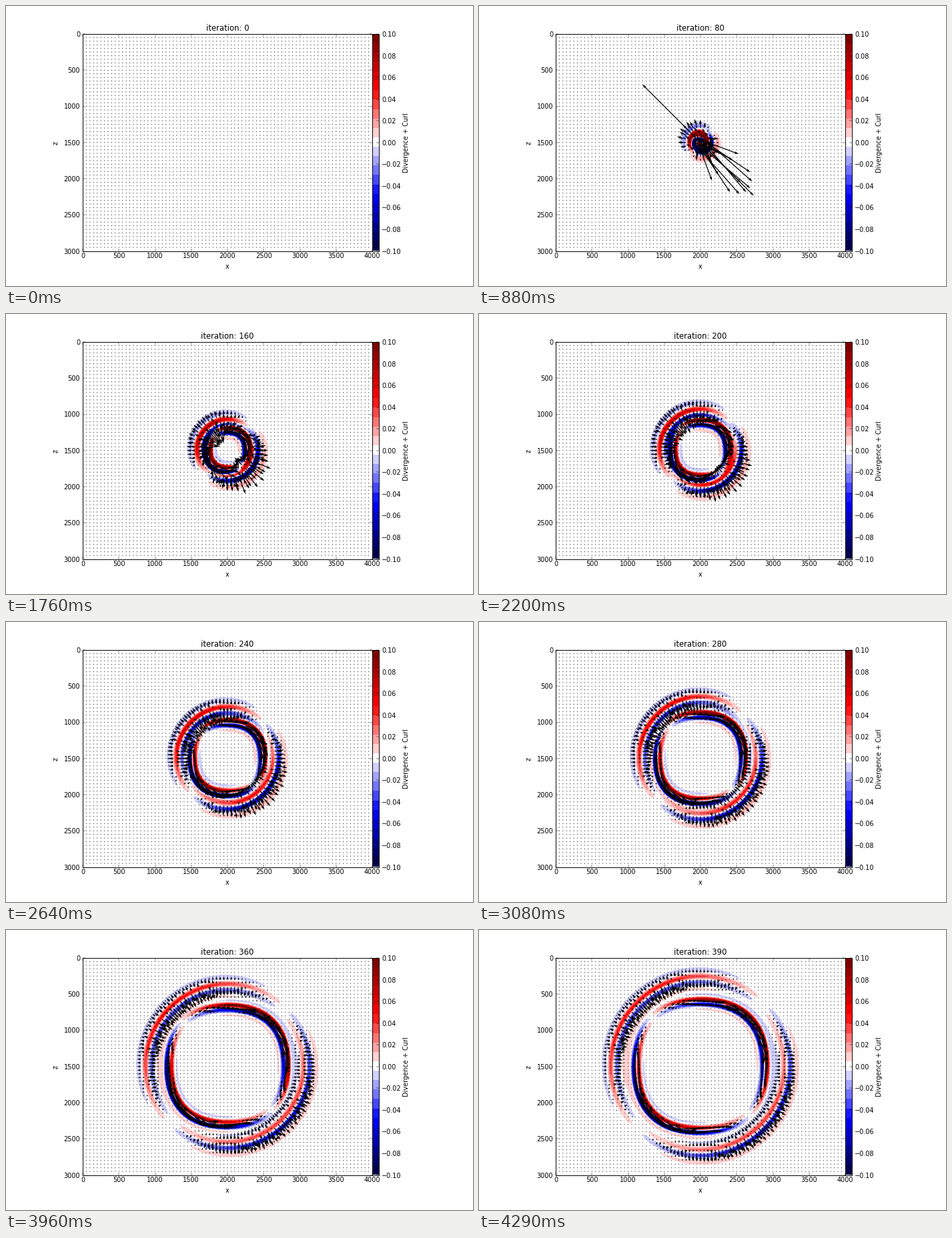
A matplotlib script for the animation above (4400 ms loop, 700 by 420 pixels).

```python
import numpy as np
import matplotlib.pyplot as plt
from matplotlib.animation import FuncAnimation

W, H, DPI = 700, 420, 70
FRAMES, INTERVAL, STEP = 40, 110, 10

SRC_X, SRC_Z = 2000, 1500
FORCE = np.array([1, 1]) / np.sqrt(2)
VP, VS = 3.55, 2.67          # metres per iteration
TP, TS = 53, 58              # arrival delay of each wave
WIDTH_P, WIDTH_S, WIDTH_T = 55, 39, 16
LOBE_P, LOBE_S = 0.9, 0.4    # weight of the side lobes

plt.rcParams.update({
    "font.family": "DejaVu Sans",
    "font.size": 10,
    "axes.linewidth": 1,
    "xtick.direction": "in", "ytick.direction": "in",
    "xtick.top": True, "ytick.right": True,
    "xtick.major.size": 4, "ytick.major.size": 4,
    "xtick.major.width": 0.5, "ytick.major.width": 0.5,
    "xtick.major.pad": 3, "ytick.major.pad": 4,
})


def pulse(x, lobe=1):
    """Gaussian with negative side lobes; lobe=1 is a Ricker wavelet."""
    return (1 - lobe * x**2) * np.exp(-x**2 / 2)


def pulse_slope(x, lobe):
    """Slope of the pulse, peak near one, stronger on the leading side."""
    slope = (lobe * x**3 - (1 + 2 * lobe) * x) * np.exp(-x**2 / 2)
    return slope / (0.6 + 0.77 * lobe) * (1 + 0.25 * np.tanh(x))


class Grid:
    """Polar geometry around the source for a mesh of points."""

    def __init__(self, x, z):
        self.x, self.z = np.meshgrid(x, z)
        dx, dz = self.x - SRC_X, self.z - SRC_Z
        self.r = np.hypot(dx, dz)
        safe = np.maximum(self.r, 1)
        self.nx, self.nz = dx / safe, dz / safe
        self.along = FORCE[0] * self.nx + FORCE[1] * self.nz
        self.across = FORCE[0] * self.nz - FORCE[1] * self.nx
        # shear fronts run faster on the diagonals
        self.stretch = 1 + 0.055 * (2 * self.nx * self.nz)**2

    def phases(self, t):
        p = (self.r - VP * (t - TP)) / WIDTH_P
        s = (self.r - VS * (t - TS) * self.stretch) / WIDTH_S
        return p, s


def ramp(t):
    return min(1, t / 20)


def strain(g, t):
    p, s = g.phases(t)
    spread = np.sqrt(1196 / (g.r + 60))
    return ramp(t) * spread * (0.043 * g.along * pulse_slope(p, LOBE_P)
                               + 0.09 * g.across * pulse_slope(s, LOBE_S))


def motion(g, t):
    """Arrow components in pixels, z pointing down."""
    p, s = g.phases(t)
    push = 19 * np.sqrt(1196 / (g.r + 60)) * g.along * pulse(p)
    shear = 27 * (883 / (g.r + 60))**0.2 * pulse(s, LOBE_S)
    near = 280 / (1 + (g.r / 42)**2) * np.exp(-(g.r / 150)**2)
    near = near * pulse((t - TP - g.r / VS) / WIDTH_T)
    parts = []
    for f, n in zip(FORCE, (g.nx, g.nz)):
        parts.append(ramp(t) * (push * n + shear * (f - g.along * n)
                                + near * (f + 0.1 * n)))
    return parts


fig = plt.figure(figsize=(W / DPI, H / DPI), dpi=DPI, facecolor="white")


def add_axes(left, top, right, bottom):
    return fig.add_axes([left / W, 1 - bottom / H,
                         (right - left) / W, (bottom - top) / H])


def label(x, y, s, **kw):
    fig.text(x / W, 1 - y / H, s, ha="center", va="center", **kw)


ax = add_axes(115, 42, 549, 367.5)
cax = add_axes(549, 42, 559, 367.5)
cmap = plt.get_cmap("seismic", 23)
shades = dict(cmap=cmap, vmin=-0.1, vmax=0.1, interpolation="nearest",
              aspect="auto")

cols, rows = 434, 326
pixels = Grid((np.arange(cols) + 0.5) * 4000 / cols,
              (np.arange(rows) + 0.5) * 3000 / rows)
nodes = Grid(np.arange(50, 4000, 50), np.arange(50, 3000, 50))

image = ax.imshow(strain(pixels, 0), extent=(0, 4000, 3000, 0), **shades)
arrows = ax.quiver(nodes.x, nodes.z, 0 * nodes.x, 0 * nodes.z, color="black",
                   scale_units="width", scale=434, width=0.0029, zorder=2)
ax.set_xlim(0, 4000)
ax.set_ylim(3000, 0)
ax.set_xticks(range(0, 4001, 500))
ax.set_yticks(range(0, 3001, 500))
title = ax.set_title("iteration: 0", fontsize=12, pad=5)

cax.imshow(np.linspace(-0.1, 0.1, 326)[:, None], origin="lower",
           extent=(0, 1, -0.1, 0.1), **shades)
cax.set_xticks([])
cax.yaxis.tick_right()
cax.tick_params(axis="y", left=False)
ticks = np.arange(-5, 6) / 50
cax.set_yticks(ticks, [f"{v:.2f}".replace("-", "\u2212") for v in ticks])

label(332, 391, "x")
label(75, 205, "z", rotation=90)
label(600, 205, "Divergence + Curl", rotation=90)


def update(i):
    t = i * STEP
    image.set_data(strain(pixels, t))
    u, w = motion(nodes, t)
    arrows.set_UVC(u, -w)
    title.set_text(f"iteration: {t}")
    return image, arrows, title


anim = FuncAnimation(fig, update, frames=FRAMES, interval=INTERVAL,
                     repeat=True, repeat_delay=0, blit=False)
plt.show()
```
